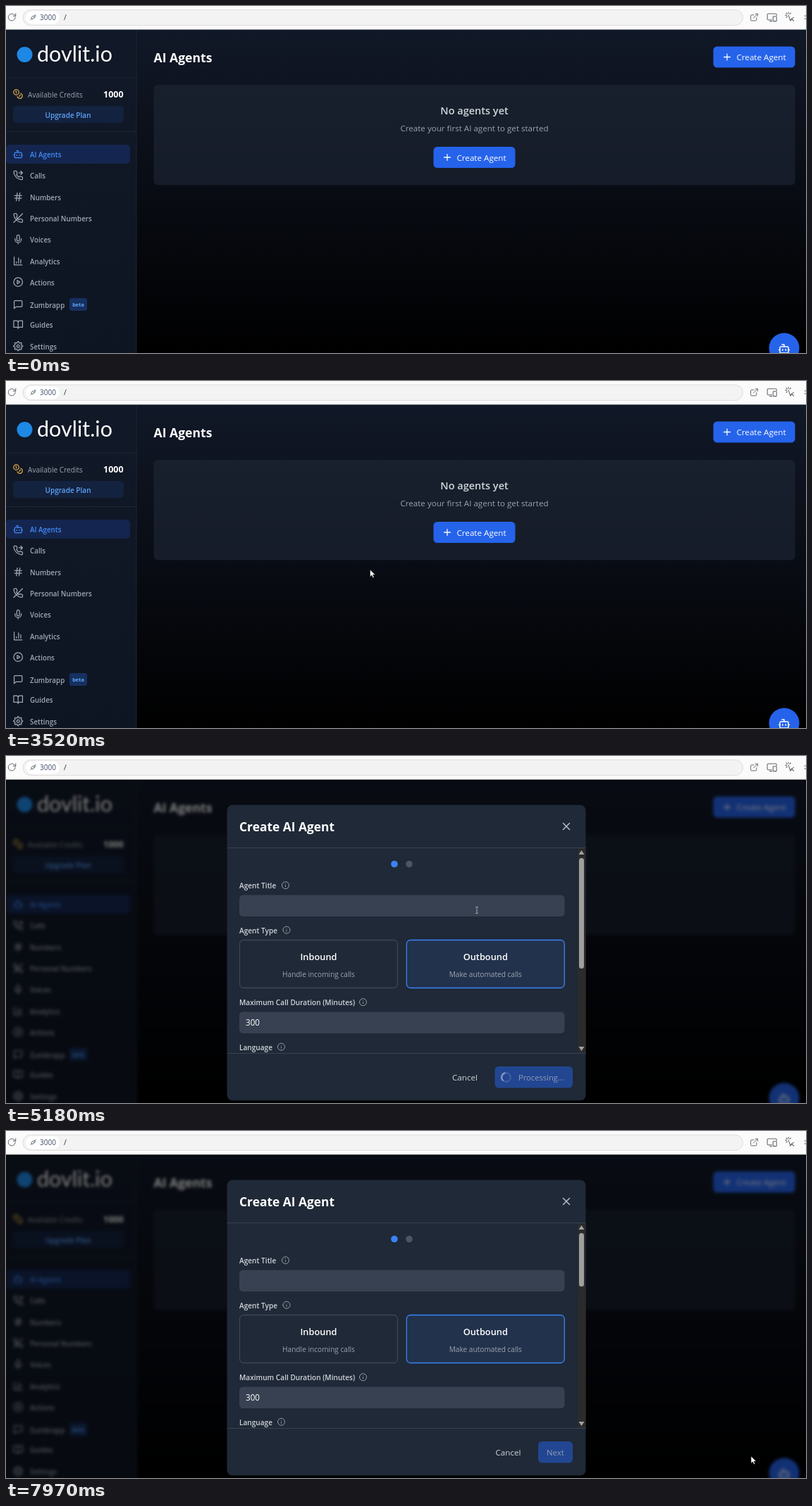
Write an HTML page that moves like this. It is 1135x493 px and loops after 8 s.

```html
<!DOCTYPE html>
<html lang="en">
<head>
<meta charset="utf-8">
<title>AI Agents</title>
<style>
  html, body { margin: 0; width: 100%; height: 100%; overflow: hidden; background: #000; }
  svg { display: block; width: 1135px; height: 493px; font-family: "Open Sans", "Noto Sans", sans-serif; }
  .icon { fill: none; stroke-width: 2; stroke-linecap: round; stroke-linejoin: round; }
  .wordmark { font-family: Lato, sans-serif; }
  .blurred { filter: blur(2.3px); }
</style>
</head>
<body>
<svg id="stage" viewBox="0 0 1135 493">
  <defs>
    <linearGradient id="sky" x1="0" y1="0" x2="0" y2="1">
      <stop offset="0" stop-color="#111827"/><stop offset="1" stop-color="#000"/>
    </linearGradient>
    <linearGradient id="side" x1="0" y1="0" x2="0" y2="1">
      <stop offset="0" stop-color="#111827"/><stop offset="1" stop-color="#0e1522"/>
    </linearGradient>
    <clipPath id="form"><rect x="313" y="131" width="509" height="291"/></clipPath>
  </defs>
  <g id="page"></g>
  <rect id="shade" y="33" width="1135" height="460" fill="#000" opacity=".5"/>
  <g id="bar"></g>
  <g id="modal">
    <g id="panel"></g>
    <g id="fields" clip-path="url(#form)"></g>
    <g id="busy"></g>
    <g id="ready"></g>
  </g>
  <g id="cursor">
    <path id="arrow" d="M0 0V10.2L2.4 8 4.1 11.6 5.7 10.9 4.1 7.3H7.3Z" fill="#fff" stroke="#111" stroke-width=".6"/>
    <path id="hand" d="M-1 1Q0-.6 1 1V5Q3 4.4 3.2 5.5 5 5 5.2 6.2 6.5 6 6.5 7.4V10Q6.5 11.4 5.3 13H-.4Q-2-11 -2 10.6L-3.7 8Q-3.4 6.6-2.2 7.2L-1 8.4Z" fill="#fff" stroke="#111" stroke-width=".7"/>
    <path id="beam" d="M-2-4.5H-.6L0-4 .6-4.5H2M0-4V4M-2 4.5H-.6L0 4 .6 4.5H2" fill="none" stroke="#aab2bf" stroke-width=".9"/>
  </g>
</svg>
<script>
const $ = id => document.getElementById(id);
const NS = 'http://www.w3.org/2000/svg';

function add(parent, tag, attrs) {
  const el = document.createElementNS(NS, tag);
  for (const key in attrs) el.setAttribute(key, attrs[key]);
  return parent.appendChild(el);
}
const box = (g, x, y, width, height, rx, fill, more) =>
  add(g, 'rect', { x, y, width, height, rx, fill, ...more });
const dot = (g, cx, cy, r, fill, more) => add(g, 'circle', { cx, cy, r, fill, ...more });
const line = (g, d, stroke, width = 1) =>
  add(g, 'path', { d, stroke, fill: 'none', 'stroke-width': width, 'stroke-linecap': 'round', 'stroke-linejoin': 'round' });
function text(g, str, x, y, size, fill, weight = 400, more) {
  add(g, 'text', { x, y, fill, 'font-size': size, 'font-weight': weight, ...more }).textContent = str;
}
const mid = { 'text-anchor': 'middle' };

const ring = (x, y, r) => `M${x - r} ${y}a${r} ${r} 0 1 0 ${2 * r} 0a${r} ${r} 0 1 0 ${-2 * r} 0`;
const gear = Array.from({ length: 72 }, (_, i) => {
  const a = i * Math.PI / 36, r = 8.9 + 1.5 * Math.tanh(2 * Math.cos(8 * a));
  return (12 + r * Math.sin(a)).toFixed(2) + ' ' + (12 - r * Math.cos(a)).toFixed(2);
}).join('L');
const phone = 'M22 16.9v3a2 2 0 0 1-2.2 2A19.8 19.8 0 0 1 2.1 4.2 2 2 0 0 1 4.1 2h3a2 2 0 0 1 2 1.7q.2 1.4.7 2.8a2 2 0 0 1-.4 2.1L8.1 9.9a16 16 0 0 0 6 6l1.3-1.3a2 2 0 0 1 2.1-.4q1.4.5 2.8.7a2 2 0 0 1 1.7 2z';
const icons = {
  bot: 'M12 8V4H8M6 8h12a2 2 0 0 1 2 2v8a2 2 0 0 1-2 2H6a2 2 0 0 1-2-2v-8a2 2 0 0 1 2-2zM2 14h2M20 14h2M15 13v2M9 13v2',
  call: phone + 'M18 2l4 4-4 4M14 6h8',
  hash: 'M4 9h16M4 15h16M10 3 8 21M16 3l-2 18',
  noCall: phone + 'M22 2 2 22',
  mic: 'M12 2a3 3 0 0 0-3 3v7a3 3 0 0 0 6 0V5a3 3 0 0 0-3-3zM19 10v2a7 7 0 0 1-14 0v-2M12 19v3',
  chart: 'M3 3v18h18M8 17v-3M13 17V5M18 17V9',
  play: ring(12, 12, 10) + 'M10 8l6 4-6 4z',
  chat: 'M21 15a2 2 0 0 1-2 2H7l-4 4V5a2 2 0 0 1 2-2h14a2 2 0 0 1 2 2z',
  book: 'M2 3h6a4 4 0 0 1 4 4v14a3 3 0 0 0-3-3H2zM22 3h-6a4 4 0 0 0-4 4v14a3 3 0 0 1 3-3h7z',
  gear: 'M' + gear + 'z' + ring(12, 12, 3),
  coins: ring(8, 8, 6) + 'M18.1 10.4A6 6 0 1 1 10.3 18M7 6h1v4M16.7 13.9l.7.7-2.8 2.8',
  plus: 'M5 12h14M12 5v14',
  close: 'M18 6 6 18M6 6l12 12',
  info: ring(12, 12, 10) + 'M12 16v-4M12 8h.01',
  reload: 'M20 12a8.5 8.5 0 1 1-2.5-6L21 9M21 3v6h-6',
  plug: 'M3 21l4-4M7 17q-3-4 1-7l2-2 6 6-2 2q-3 4-7 1M13 8l3-3M16 11l3-3M16 14q5-4 2-8M18 6l3-3',
  open: 'M15 3h6v6M10 14 21 3M18 13v6a2 2 0 0 1-2 2H5a2 2 0 0 1-2-2V8a2 2 0 0 1 2-2h6',
  screens: 'M11 18H3a2 2 0 0 1-2-2V6a2 2 0 0 1 2-2h17a2 2 0 0 1 2 2v2M7 21h4M15 10h6a1 1 0 0 1 1 1v9a1 1 0 0 1-1 1h-6a1 1 0 0 1-1-1v-9a1 1 0 0 1 1-1z',
  click: 'M9 9l4.5 13 2.3-5 5.2 5M15.800 17l5.200-2.500zM9 2v3M2 9h3M4 4l2 2M14 4l-2 2M4 14l2-2'
};
function icon(g, name, cx, cy, size, stroke, weight = 2) {
  const k = size / 24;
  add(g, 'path', { d: icons[name], class: 'icon', stroke, style: `stroke-width:${weight}`,
    transform: `translate(${cx - size / 2} ${cy - size / 2}) scale(${k})` });
}

function createButton(g, x, y) {
  const face = box(g, x, y, 116, 30, 5.5, '#2563eb');
  icon(g, 'plus', x + 19.5, y + 15, 15.2, '#fff');
  text(g, 'Create Agent', x + 33, y + 19.7, 11.65, '#fff', 500);
  return face;
}

// Dashboard
const page = $('page');
box(page, -20, 33, 1175, 462, 0, 'url(#sky)');
box(page, -20, 33, 205, 480, 0, 'url(#side)');
line(page, 'M185 33V500M-10 102H185M-10 178.500H185', '#1d2736');
dot(page, 26.500, 69, 11, '#1e88e5');
text(page, 'dovlit.io', 44, 78.500, 30.5, '#fff', 400, { class: 'wordmark' });
icon(page, 'coins', 17, 125, 15, '#e0ac4a');
text(page, 'Available Credits', 31, 129.500, 10.1, '#9ca3af');
text(page, '1000', 138, 130, 12.5, '#fff', 700);
box(page, 10, 142, 157, 24, 5, '#13223f');
text(page, 'Upgrade Plan', 88, 158.500, 10.05, '#60a5fa', 600, mid);
box(page, 0, 197, 176, 27, 5, '#14264f');
[['bot', 'AI Agents', 211], ['call', 'Calls', 241], ['hash', 'Numbers', 271.500],
 ['noCall', 'Personal Numbers', 301.500], ['mic', 'Voices', 332], ['chart', 'Analytics', 362.500],
 ['play', 'Actions', 392.500], ['chat', 'Zumbrapp', 424.500], ['book', 'Guides', 453],
 ['gear', 'Settings', 483.500]].forEach(([name, label, y], i) => {
  const tone = i ? '#a0a8b4' : '#438af7';
  icon(page, name, 17.200, y - .3, 15, tone);
  text(page, label, 34, y + 4, 9.8, tone, 600);
});
box(page, 90, 415, 25, 18, 3, '#16305f');
text(page, 'beta', 102.500, 427, 7.4, '#60a5fa', 700, mid);
text(page, 'AI Agents', 209.500, 80, 17.6, '#fff', 700);
createButton(page, 1003.500, 57.500);
box(page, 209.500, 112, 910, 142.500, 6, '#1f2937', { 'fill-opacity': .58 });
text(page, 'No agents yet', 664.500, 153.500, 14.5, '#d1d5db', 600, mid);
text(page, 'Create your first AI agent to get started', 664.500, 177.500, 11.6, '#9ca3af', 400, mid);
const face = createButton(page, 606.500, 200);
dot(page, 1104, 486, 21.500, '#2563eb');
icon(page, 'bot', 1104, 487, 18, '#fff');

// Browser bar
const bar = $('bar');
box(bar, 0, 0, 1135, 33.500, 0, '#fbfbfb');
box(bar, 24, 5.500, 1021.500, 22, 11, '#f3f3f3', { stroke: '#dedede' });
box(bar, 28, 7.500, 48, 18, 9, '#fff');
icon(bar, 'reload', 8.500, 16, 14, '#60656c', 1.7);
icon(bar, 'plug', 38.500, 16, 10, '#4b5563');
text(bar, '3000', 48, 19.500, 10, '#3b4a66');
text(bar, '/', 82, 20, 10.5, '#333');
icon(bar, 'open', 1061.500, 16, 13, '#60656c', 1.8);
icon(bar, 'screens', 1087, 16, 15, '#60656c', 1.7);
icon(bar, 'click', 1112, 15, 15, '#60656c', 1.7);
line(bar, 'M1133 14h3M1133 18h3', '#60656c');

// Dialog
const panel = $('panel'), fields = $('fields'), busy = $('busy'), ready = $('ready');
box(panel, 313.500, 69.500, 509, 420, 8, '#1f2937');
line(panel, 'M314 130.500H822M314 422.500H822', '#374151');
text(panel, 'Create AI Agent', 331, 107, 17.4, '#fff', 700);
icon(panel, 'close', 795, 100, 18, '#b6bcc6');
box(panel, 811, 131, 11.500, 291, 0, '#2b2b2c');
add(panel, 'path', { d: 'M816.5 134l4 6h-8zM816.500 419l4-6h-8z', fill: '#a0a0a0' });
const thumb = box(panel, 813, 145, 7, 157, 3.5, '#9f9f9f');
dot(fields, 551, 153.500, 4.8, '#3b82f6');
dot(fields, 572, 153.500, 4.8, '#4b5563');
[['Agent Title', 188, 396.500], ['Agent Type', 251.500, 398], ['Maximum Call Duration (Minutes)', 354, 506.500],
 ['Language', 417.500, 390.500]].forEach(([label, y, x]) => {
  text(fields, label, 331, y, 10.1, '#d1d5db', 600);
  icon(fields, 'info', x, y - 4.300, 12, '#a3aab5', 1.8);
});
box(fields, 331, 197.500, 461.500, 30.500, 5.5, '#374151');
box(fields, 331, 363.500, 461.500, 30.500, 5.5, '#374151');
text(fields, '300', 340, 383, 11.7, '#fff');
[['Inbound', 'Handle incoming calls', 331.500, '#1f2937', '#3c4654'],
 ['Outbound', 'Make automated calls', 568.300, '#22324c', '#3b82f6']].forEach(([name, note, x, fill, stroke]) => {
  box(fields, x, 261.500, 224, 68, 5.5, fill, { stroke, 'stroke-width': 1.3 });
  text(fields, name, x + 112, 290, 12.8, '#fff', 600, mid);
  text(fields, note, x + 112, 313.500, 10.15, '#9ca3af', 400, mid);
});
function footer(g, x, label, labelX, size) {
  text(g, 'Cancel', x - 60.500, 461, 11.65, '#d1d5db');
  box(g, x, 441, 804 - x, 30.500, 5.5, '#224691');
  text(g, label, labelX, 461, size, '#909cb8', 500);
}
footer(busy, 693.500, 'Processing...', 727, 11.2);
footer(ready, 755, 'Next', 767, 11.4);
dot(busy, 709.500, 456.500, 6.3, 'none', { stroke: '#3d5ca0', 'stroke-width': 2.4 });
const arc = add(busy, 'path', { d: 'M0-6.300A6.300 6.300 0 0 0-4.700 4.200', fill: 'none', stroke: '#7f93c2', 'stroke-width': 2.4 });

// Pointer route: time, x, y
const route = [
  [450, 1018, 494], [1190, 814, 409], [1300, 776, 396], [1460, 683, 367], [1660, 657, 357],
  [1790, 657, 357], [2330, 46, 209], [2840, 46, 209], [3520, 516, 268], [3650, 573, 271],
  [3720, 577, 271], [4180, 674, 254], [4360, 674, 254], [4650, 668, 219], [6630, 668, 219],
  [6740, 686, 234], [6910, 780, 316], [7570, 1008, 434], [7950, 1057, 462]
];
function slope(i, axis) {
  const a = route[i - 1], b = route[i], c = route[i + 1];
  if (!a || !c) return 0;
  const p = (b[axis] - a[axis]) / (b[0] - a[0]), q = (c[axis] - b[axis]) / (c[0] - b[0]);
  return p * q <= 0 ? 0 : 2 * p * q / (p + q);
}
function pointAt(t, axis) {
  const last = route.length - 1;
  if (t >= route[last][0]) return route[last][axis];
  const i = Math.max(0, route.findIndex(p => p[0] > t) - 1);
  const a = route[i], b = route[i + 1], d = b[0] - a[0], u = Math.max(0, (t - a[0]) / d), v = 1 - u;
  return a[axis] * v * v * (1 + 2 * u) + b[axis] * u * u * (3 - 2 * u)
    + d * (slope(i, axis) * u * v * v - slope(i + 1, axis) * u * u * v);
}

const OPEN = 5176, DONE = 7640, SHRINK = 6300, HOVER = 4500;
const inside = (x, y, l, t, r, b) => x >= l && x <= r && y >= t && y <= b;
const show = (el, on) => el.setAttribute('visibility', on ? 'inherit' : 'hidden');

function shape(t, x, y) {
  if (t >= 5050 && inside(x, y, 331, 197, 793, 228)) return 'beam';
  const hot = t < OPEN
    ? inside(x, y, 0, 197, 176, 224) || inside(x, y, 607, 200, 722, 230)
    : inside(x, y, 568, 261, 793, 330);
  return hot ? 'hand' : 'arrow';
}

function draw() {
  const t = performance.now() % 8000, open = t >= OPEN, done = t >= DONE;
  page.classList.toggle('blurred', open);
  show($('shade'), open);
  $('modal').setAttribute('visibility', open ? 'visible' : 'hidden');
  show(busy, !done);
  show(ready, done);
  thumb.setAttribute('height', t < SHRINK ? 157 : 76);
  arc.setAttribute('transform', `translate(709.5 456.5) rotate(${(t - 5208) * .36})`);

  const h = open ? 0 : Math.min(1, Math.max(0, (t - HOVER) / 150));
  face.setAttribute('fill', `rgb(${37 - 8 * h},${99 - 21 * h},${235 - 19 * h})`);

  const x = pointAt(t, 1), y = pointAt(t, 2), kind = shape(t, x, y);
  $('cursor').setAttribute('visibility', t < 450 ? 'hidden' : 'visible');
  $('cursor').setAttribute('transform', `translate(${x} ${y})`);
  for (const id of ['arrow', 'hand', 'beam']) show($(id), id === kind);
  requestAnimationFrame(draw);
}
draw();
</script>
</body>
</html>
```
